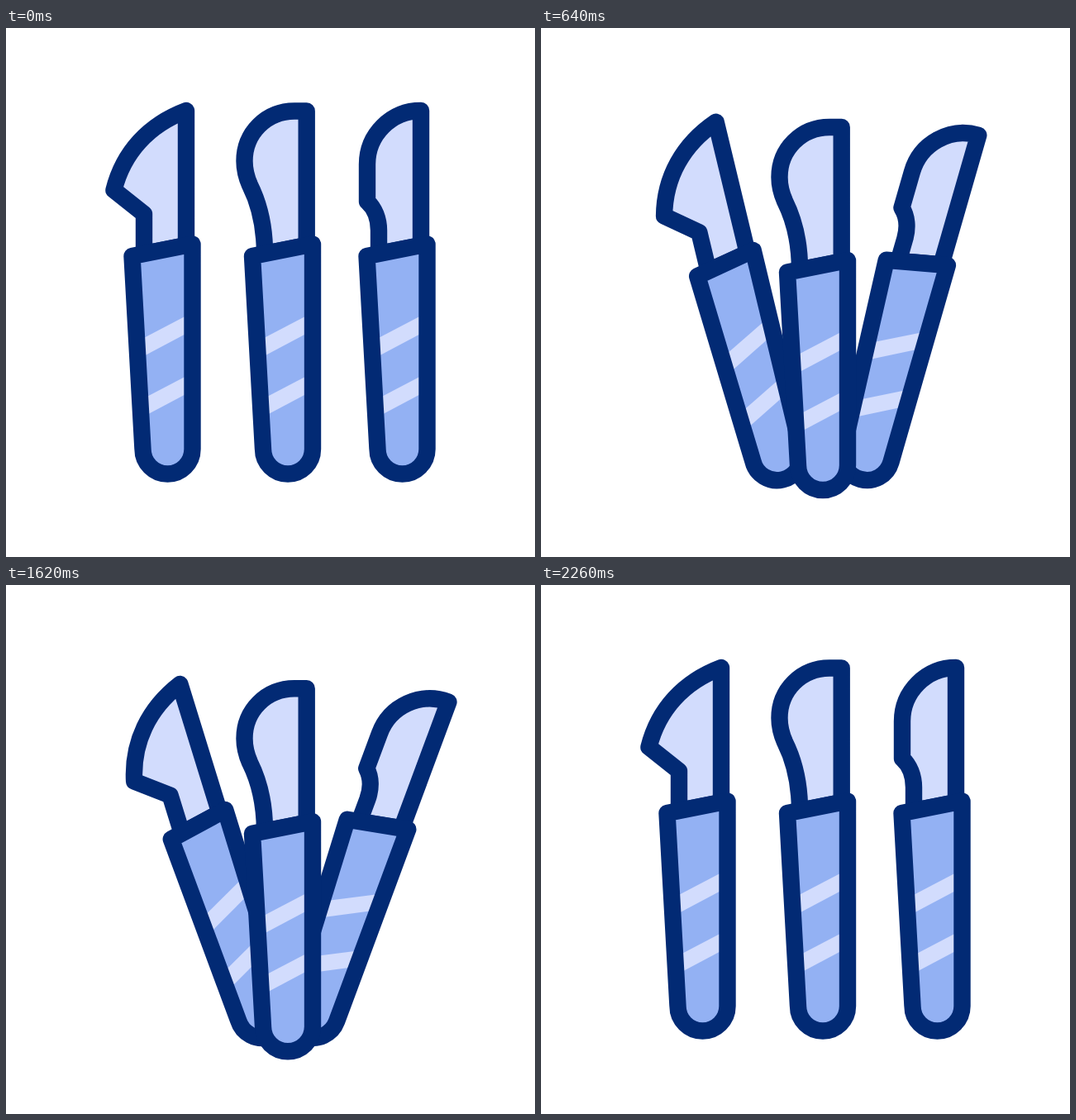
Write an HTML page that moves like this. It is 640 px wide and 640 px high and loops after 2400 ms.

```html
<!DOCTYPE html>
<html lang="en">
<head>
<meta charset="utf-8">
<style>
  html, body { margin: 0; width: 100%; height: 100%; overflow: hidden; background: #fff; }
  svg { display: block; width: 100%; height: 100%; }
  .line { stroke: #022a74; stroke-width: 20.4; stroke-linejoin: round; }
  .light { fill: #d2dcfd; }
  .grip { fill: #93b1f3; }
  .spark { stroke: #ffcb52; stroke-width: 20.4; stroke-linecap: round; }
</style>
</head>
<body>
<svg viewBox="0 0 640 640">
  <defs>
    <g id="handle">
      <path id="shape" class="grip" d="M152.500 276L225.500 261.500V509.500A30 30 0 0 1 165.500 509.500Z"/>
      <path id="stripe" class="light" d="M160 378.500L225 344.500V366L160 400.500Z"/>
      <use href="#stripe" y="73"/>
      <use href="#shape" class="line" style="fill-opacity:0"/>
    </g>
  </defs>
  <g id="left">
    <path class="line light" d="M218 100V263L167 273V225L130.500 196C142 150 173 117 218 100Z"/>
    <use href="#handle"/>
  </g>
  <g id="right">
    <path class="line light" d="M502 100V263L451 273V245C451 231 446 218 437 210V165C437 129 466 100 502 100Z"/>
    <use href="#handle" x="284"/>
  </g>
  <g id="middle">
    <path class="line light" d="M363.700 100.500V263L313 273C313 240 307 214 295 190C291 181 288.500 172 288.500 161C288.500 127 315 100.500 349 100.500Z"/>
    <use href="#handle" x="145.500"/>
  </g>
  <g id="sparks"></g>
</svg>
<script>
const LOOP = 2400, OPEN_END = 1200, CLOSE_END = 2260;
const byId = id => document.getElementById(id);
const clamp = v => Math.min(1, Math.max(0, v));
const phase = (t, from, to) => clamp((t - from) / (to - from));

// cubic-bezier(.75, 0, .25, 1)
function ease(x) {
  let lo = 0, hi = 1, u = 0.5;
  for (let i = 0; i < 24; i++) {
    u = (lo + hi) / 2;
    const bx = 2.25 * (1 - u) ** 2 * u + 0.75 * (1 - u) * u * u + u ** 3;
    if (bx < x) lo = u; else hi = u;
  }
  return u * u * (3 - 2 * u);
}

const knives = [
  { el: byId('left'), pivot: [215, 370], shift: [90.5, 11.1], turn: -21.5 },
  { el: byId('right'), pivot: [472, 400], shift: [-86.5, 15.5], turn: 25.5 },
  { el: byId('middle'), pivot: [341, 320], shift: [0, 31], turn: 0 }
];

// inner end, outer end
const sparks = [[381.7, 75, 383.7, 46.5], [427, 90, 438, 69], [455, 122, 479, 109]].map(ends => {
  const el = document.createElementNS('http://www.w3.org/2000/svg', 'line');
  el.setAttribute('class', 'spark');
  byId('sparks').append(el);
  return { el, ends };
});

function draw(t) {
  const open = t < OPEN_END
    ? ease(t / OPEN_END)
    : 1 - ease(phase(t, OPEN_END, CLOSE_END));
  for (const { el, pivot, shift, turn } of knives) {
    el.setAttribute('transform',
      `translate(${shift[0] * open} ${shift[1] * open}) rotate(${turn * open} ${pivot})`);
  }

  const head = phase(t, 760, 920), tail = phase(t, 980, 1080);
  byId('sparks').style.display = head > 0 && tail < 1 ? '' : 'none';
  for (const { el, ends: [x1, y1, x2, y2] } of sparks) {
    el.setAttribute('x1', x1 + (x2 - x1) * tail);
    el.setAttribute('y1', y1 + (y2 - y1) * tail);
    el.setAttribute('x2', x1 + (x2 - x1) * head);
    el.setAttribute('y2', y1 + (y2 - y1) * head);
  }
}

function tick() {
  draw(performance.now() % LOOP);
  requestAnimationFrame(tick);
}
tick();
</script>
</body>
</html>
```
